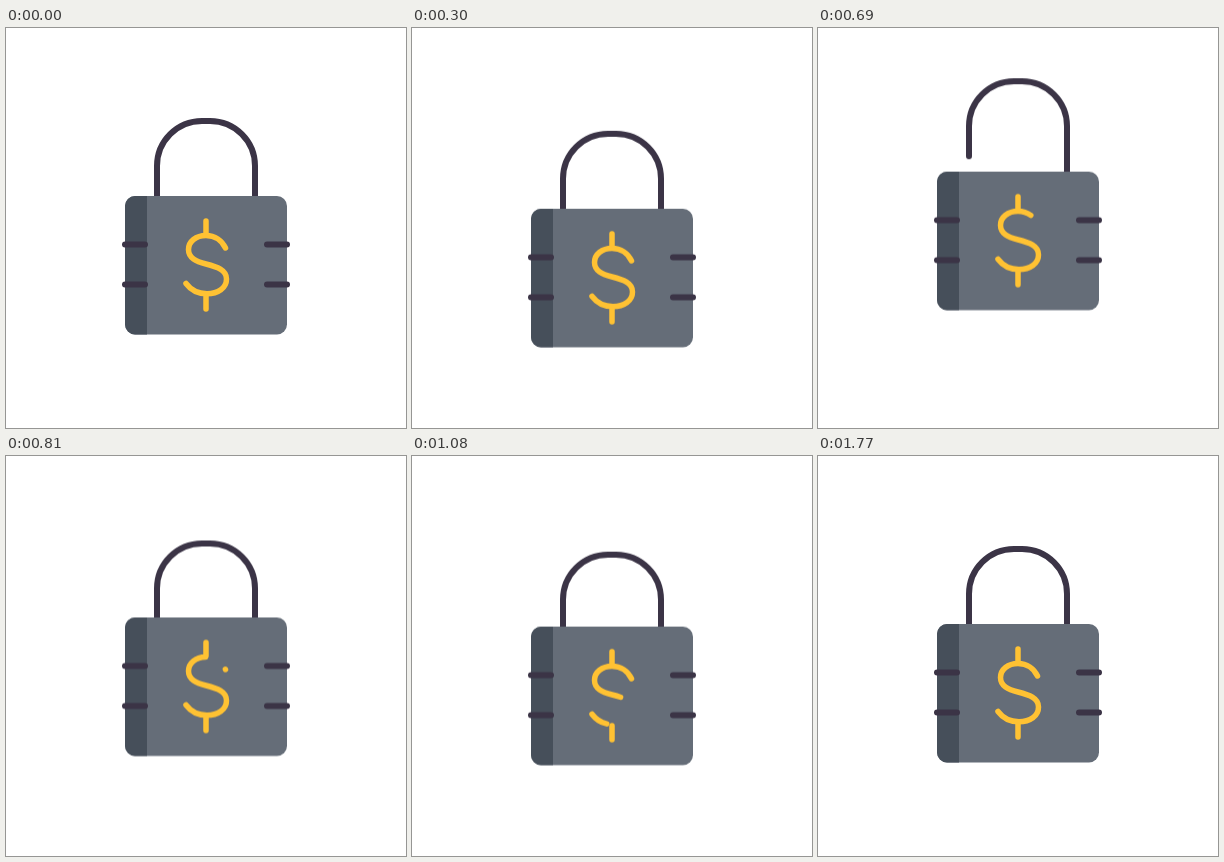
These frames come from a looping animation (400x400 px, 3860 ms). An HTML page:

```html
<!DOCTYPE html>
<html lang="en">
<head>
<meta charset="utf-8">
<title>Padlock</title>
<style>
  html, body { margin: 0; width: 100%; height: 100%; overflow: hidden; background: #fff; }
  svg { display: block; width: 100%; height: 100%; }
  .line { fill: none; stroke: #3b3446; stroke-width: 6; stroke-linecap: round; }
  .gold { fill: none; stroke: #ffc233; stroke-width: 5.5; stroke-linecap: round; }
  .lock, .shackle, .curve { animation: 3860ms linear infinite; }
  .lock { animation-name: bounce; }
  .shackle { animation-name: open; }
  .curve { animation-name: redraw; }

  @keyframes bounce {
    0%, .6% { transform: translateY(0); animation-timing-function: cubic-bezier(.65, 0, .35, 1); }
    9.84% { transform: translateY(13.5px); animation-timing-function: cubic-bezier(.4, 0, .5, 1); }
    14.1% { transform: translateY(-30.3px); animation-timing-function: cubic-bezier(.62, 0, .75, .87); }
    24.09% { transform: translateY(13.5px); animation-timing-function: cubic-bezier(.25, 0, .5, 1); }
    31.74% { transform: translateY(-3px); animation-timing-function: cubic-bezier(.35, 0, .6, 1); }
    41.97%, 100% { transform: translateY(0); }
  }
  @keyframes open {
    0%, 10.1% { transform: translateY(0); animation-timing-function: cubic-bezier(.4, 0, .5, 1); }
    14.1% { transform: translateY(-40.5px); animation-timing-function: cubic-bezier(.5, 0, .5, 1); }
    20.98% { transform: translateY(1px); animation-timing-function: ease-in-out; }
    27.98% { transform: translateY(3px); animation-timing-function: ease-in-out; }
    34.2%, 100% { transform: translateY(0); }
  }
  /* One gap travels along the curve: dash, gap, and where the gap begins. */
  @keyframes redraw {
    0%, 12.44% { stroke-dasharray: 101 0; stroke-dashoffset: 101; }
    14.77% { stroke-dasharray: 98 3; stroke-dashoffset: 98; }
    17.88% { stroke-dasharray: 94 7; stroke-dashoffset: 94; }
    20.98% { stroke-dasharray: 85 16; stroke-dashoffset: 85; }
    24.09% { stroke-dasharray: 71 30; stroke-dashoffset: 55; }
    27.98% { stroke-dasharray: 67 34; stroke-dashoffset: 13; }
    29.53% { stroke-dasharray: 64 37; stroke-dashoffset: 0; }
    31.09% { stroke-dasharray: 73 28; stroke-dashoffset: 0; }
    34.2% { stroke-dasharray: 84 17; stroke-dashoffset: 0; }
    41.97% { stroke-dasharray: 86 15; stroke-dashoffset: 0; }
    45.85%, 100% { stroke-dasharray: 101 0; stroke-dashoffset: 0; }
  }
</style>
</head>
<body>
<svg viewBox="0 0 400 400">
  <g class="lock">
    <path class="line shackle" d="M151 168V138A45 45 0 0 1 196 93H204A45 45 0 0 1 249 138V215"/>
    <rect x="119" y="168" width="162" height="138.5" rx="10" fill="#656d78"/>
    <path d="M141 168H129A10 10 0 0 0 119 178V296.500A10 10 0 0 0 129 306.500H141Z" fill="#464f5a"/>
    <path class="line" d="M119 216.500H139M119 256.500H139M261 216.500H281M261 256.500H281"/>
    <path class="gold" d="M200 193V206M200 267V281"/>
    <path class="gold curve" pathLength="100" d="M219.500 220C216 212.500 209 207.500 200 207.500C190 207.500 182.500 213.500 182.500 221.500C182.500 230 190 233.500 200 236C211 238.700 220.500 242 220.500 251C220.500 260 212 265.800 201 265.800C191 265.800 184.500 261.500 180 255.500"/>
  </g>
</svg>
</body>
</html>
```
